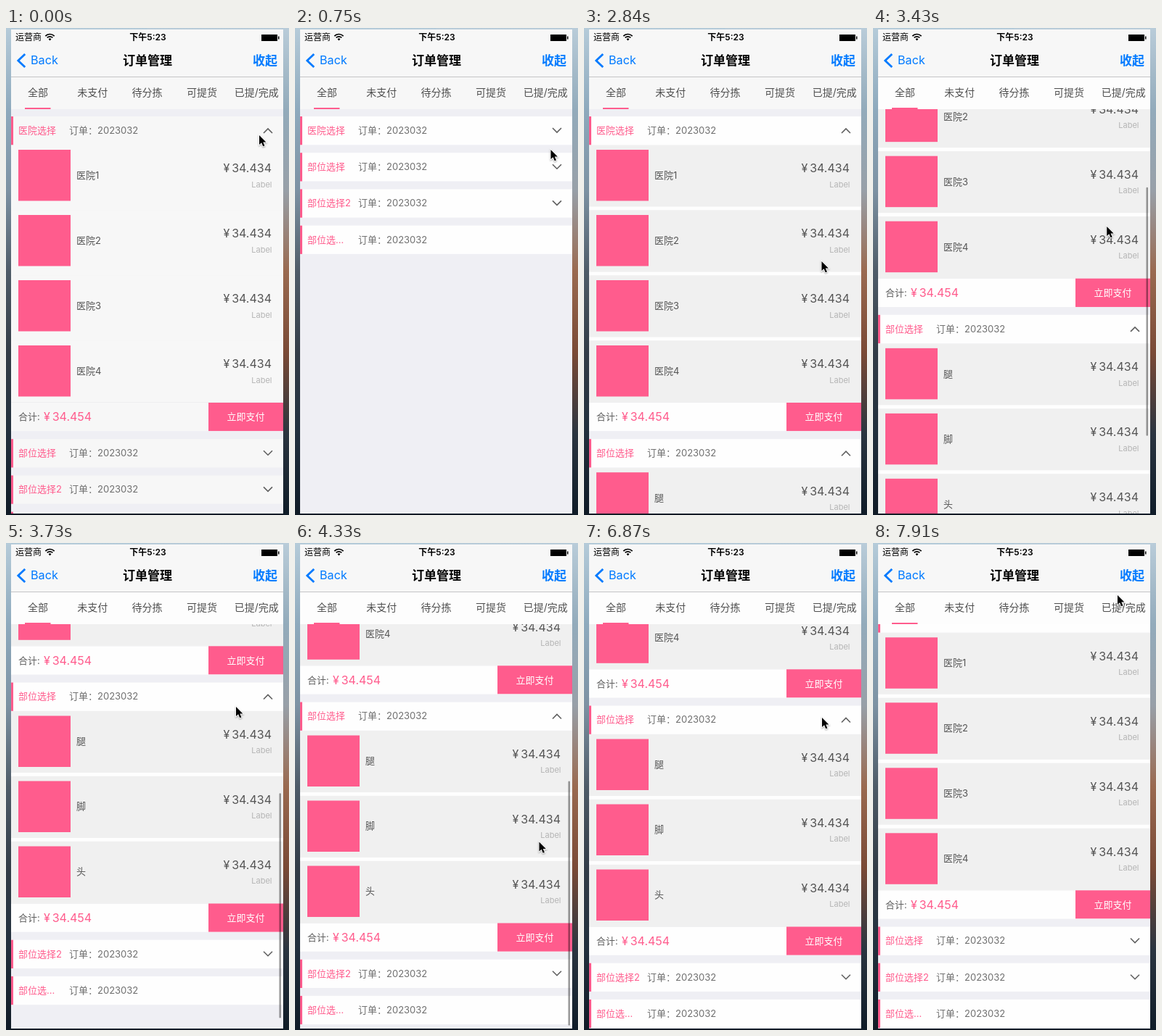
Write an HTML page with a canvas that moves like this. It is 390 px wide and 672 px high and loops after 8000 ms.

```html
<!DOCTYPE html>
<html lang="zh">
<head>
<meta charset="utf-8">
<style>
  html, body { margin: 0; width: 100%; height: 100%; overflow: hidden; }
  canvas { display: block; }
</style>
</head>
<body>
<canvas id="stage" width="390" height="672"></canvas>
<script>
const c = document.getElementById('stage').getContext('2d');
const FONT = 'Inter, "Noto Sans CJK SC", "Noto Sans CJK", sans-serif';
const PINK = '#ff5c8d', BLUE = '#007aff', BACK = '#efeff4';
const LOOP = 8000, STEP = 149.2;
const LEFT = 7, WIDTH = 375, TOP = 112, BOTTOM = 670;
const HEADER = 39.3, PITCH = 50.2, ROW = 90, FOOTER = 35;
const FLICK = 21, TAP_TIME = 3, GLIDE_TIME = 4, BOUNCE = 32;

// Each tap, given in steps, toggles its section.
const SECTIONS = [
  { title: '医院选择', rows: ['医院1', '医院2', '医院3', '医院4'], startsOpen: true, taps: [0, 15] },
  { title: '部位选择', rows: ['腿', '脚', '头'], taps: [7, 46] },
  { title: '部位选择2', rows: ['腿2', '脚2', '头2'], taps: [32, 37] },
  { title: '部位选…', rows: [], taps: [] }
];

// Pointer stops; each is reached at its step after a short glide.
const STOPS = [
  { step: 0, x: 349, y: 148 },
  { step: 7, x: 356, y: 188 },
  { step: 14, x: 349, y: 147 },
  { step: 19, x: 327.5, y: 322 },
  { step: 25, x: 317, y: 226 },
  { step: 31, x: 356, y: 599 },
  { step: 45, x: 328, y: 241 },
  { step: 53, x: 337, y: 72 }
];

const clamp = u => Math.max(0, Math.min(1, u));
const smooth = u => (u = clamp(u)) * u * (3 - 2 * u);

const isOpen = (s, k) => (s.taps.filter(t => t < k).length + !!s.startsOpen) % 2 === 1;

function openness(s, k) {
  const start = s.startsOpen ? 1 : 0;
  return s.taps.reduce((open, tap, i) =>
    open + ((start + i) % 2 ? -1 : 1) * clamp((k - tap) / TAP_TIME), start);
}

const bodyHeight = s => s.rows.length * ROW + FOOTER;
const extraHeight = (s, k) => bodyHeight(s) * openness(s, k);

// A flick to the end of the list that overshoots, bounces back and stays clamped.
function scrollAt(k) {
  const upper = SECTIONS.slice(0, 2).reduce((h, s) => h + extraHeight(s, k), 0);
  const end = 122 + 3 * PITCH + HEADER + upper - BOTTOM + 0.8;
  const over = BOUNCE * smooth((k - FLICK - 2) / 2) * (1 - smooth((k - FLICK - 5) / 4));
  return Math.max(0, end) * smooth((k - FLICK) / 4) + over;
}

function pointerAt(k) {
  return STOPS.reduce((p, s) => {
    const u = clamp((k - s.step) / GLIDE_TIME + 1);
    return { x: p.x + (s.x - p.x) * u, y: p.y + (s.y - p.y) * u };
  }, STOPS[0]);
}

function box(x, y, w, h, color) {
  c.fillStyle = color;
  c.fillRect(x, y, w, h);
}

const band = (y, h, color) => box(LEFT, y, WIDTH, h, color);

function text(s, x, y, size, color, align = 'left', weight = 400) {
  c.font = `${weight} ${size}px ${FONT}`;
  c.textAlign = align;
  c.textBaseline = 'middle';
  c.fillStyle = color;
  c.fillText(s, x, y + 0.5);
}

// A two-stroke arrow pointing along (dx, dy) with its middle at (x, y).
function chevron(x, y, dx, dy, spread, color, width) {
  c.beginPath();
  c.moveTo(x - dx - (dy && spread), y - dy - (dx && spread));
  c.lineTo(x + dx, y + dy);
  c.lineTo(x - dx + (dy && spread), y - dy + (dx && spread));
  c.strokeStyle = color;
  c.lineWidth = width;
  c.stroke();
}

function clip(y, h, draw) {
  c.save();
  c.beginPath();
  c.rect(LEFT, y, WIDTH, h);
  c.clip();
  draw();
  c.restore();
}

function desktop() {
  const strip = (x, ...colors) => {
    const g = c.createLinearGradient(0, 0, 0, 672);
    colors.forEach((color, i) => g.addColorStop(i / (colors.length - 1), color));
    box(x, 0, 195, 672, g);
  };
  strip(0, '#b5cbd9', '#8eaabd', '#7d92a3', '#4f5c68', '#333d47', '#22303d', '#101b26');
  strip(195, '#b9ccd9', '#93abbb', '#98a0a8', '#9a6a50', '#7a4a36', '#2b3540', '#0f1c28');
}

function wifi() {
  c.fillStyle = c.strokeStyle = '#000';
  c.lineWidth = 1.7;
  const arc = r => c.arc(60.5, 17, r, -Math.PI * 0.76, -Math.PI * 0.24);
  for (const r of [8.5, 5.2]) {
    c.beginPath();
    arc(r);
    c.stroke();
  }
  c.beginPath();
  c.moveTo(60.5, 17.5);
  arc(2.6);
  c.fill();
}

function bars(k) {
  band(2, 65, '#f7f7f7');
  text('运营商', 13, 13, 12, '#000');
  wifi();
  text('下午5:23', 195.5, 13, 12, '#000', 'center', 600);
  box(352, 9, 22, 9, '#000');
  box(375, 11.5, 1.5, 4, '#000');
  chevron(21.5, 45, -4.7, 0, 9, BLUE, 2.8);
  text('Back', 34, 45, 16.2, BLUE);
  text('订单管理', 195, 45, 17, '#000', 'center', 700);
  text('收起', 374, 45, 17, BLUE, 'right', 700);

  band(67, 45, k > FLICK ? '#fdfdfd' : '#f7f7f7');
  band(67, 1, '#c4c4c6');
  ['全部', '未支付', '待分拣', '可提货', '已提/完成'].forEach((tab, i) =>
    text(tab, 44 + i * 75.3, 89.5, 14, '#505050', 'center'));
  box(26, 110, 35.5, 2, PINK);
}

function header(section, y, open, white) {
  const mid = y + 19.5;
  band(y, HEADER, white);
  box(LEFT, y, 3, HEADER, PINK);
  text(section.title, 17, mid, 13, PINK);
  text('订单：', 87, mid, 13, '#707070');
  text('2023032', 126, mid, 13, '#707070');
  if (section.rows.length) chevron(361, mid + (open ? 0.5 : -0.5), 0, open ? -3 : 3, 6, '#606060', 1.6);
}

function body(rows, y, white, gray) {
  const foot = y + FOOTER + rows.length * ROW;
  band(y + HEADER, foot - y, white);
  rows.forEach((name, i) => {
    const top = y + i * ROW;
    band(top + HEADER, 85.2, gray);
    box(17, top + 46, 72, 70.5, PINK);
    text(name, 97, top + 81.5, 13, '#555');
    text('¥\u200934.434', 366, top + 72, 16, '#555', 'right');
    text('Label', 366.5, top + 94, 11, '#b4b4b4', 'right');
  });
  band(foot, HEADER, white);
  band(foot - 0.5, 0.5, '#e4e4e6');
  text('合计:', 17, foot + 20, 13, '#606060');
  text('¥\u200934.454', 52, foot + 20, 16, PINK);
  box(279, foot, 103, HEADER, PINK);
  text('立即支付', 330.5, foot + 20, 13, '#fff', 'center');
}

function table(k, scroll) {
  const white = k ? '#fefefe' : '#f7f7f7', gray = k ? '#f0f0f0' : '#f7f7f7';
  band(TOP, BOTTOM - TOP, BACK);
  let y = 122 - scroll;
  for (const section of SECTIONS) {
    const extra = extraHeight(section, k);
    if (extra) clip(y + HEADER, extra, () => body(section.rows, y, white, gray));
    header(section, y, isOpen(section, k), white);
    y += PITCH + extra;
  }
}

function scrollbar(scroll) {
  const rest = 342, size = 343 - Math.max(0, scroll - rest);
  const y = Math.min(TOP + 2 + scroll * 211 / rest, BOTTOM - 2 - size);
  c.beginPath();
  c.roundRect(376.5, y, 2.5, size, 1.25);
  c.fillStyle = 'rgba(0,0,0,.4)';
  c.fill();
}

const ARROW = new Path2D('M0 0V13L3.1 10.3 5.2 15.3 7.5 14.4 5.3 9.5H9.4Z');

function pointer({ x, y }) {
  c.save();
  c.translate(x, y);
  c.shadowColor = 'rgba(0,0,0,.35)';
  c.shadowBlur = 2;
  c.shadowOffsetY = 1;
  c.strokeStyle = '#fff';
  c.lineWidth = 1.8;
  c.stroke(ARROW);
  c.shadowColor = 'transparent';
  c.fillStyle = '#000';
  c.fill(ARROW);
  c.restore();
}

function frame(now) {
  // The screen refreshes in discrete steps.
  const k = Math.floor((now % LOOP + 4) / STEP);
  const scroll = scrollAt(k);
  desktop();
  clip(TOP, BOTTOM - TOP, () => table(k, scroll));
  bars(k);
  if (k > FLICK && k < FLICK + 10) scrollbar(scroll);
  pointer(pointerAt(k));
  requestAnimationFrame(frame);
}
requestAnimationFrame(frame);
</script>
</body>
</html>
```
